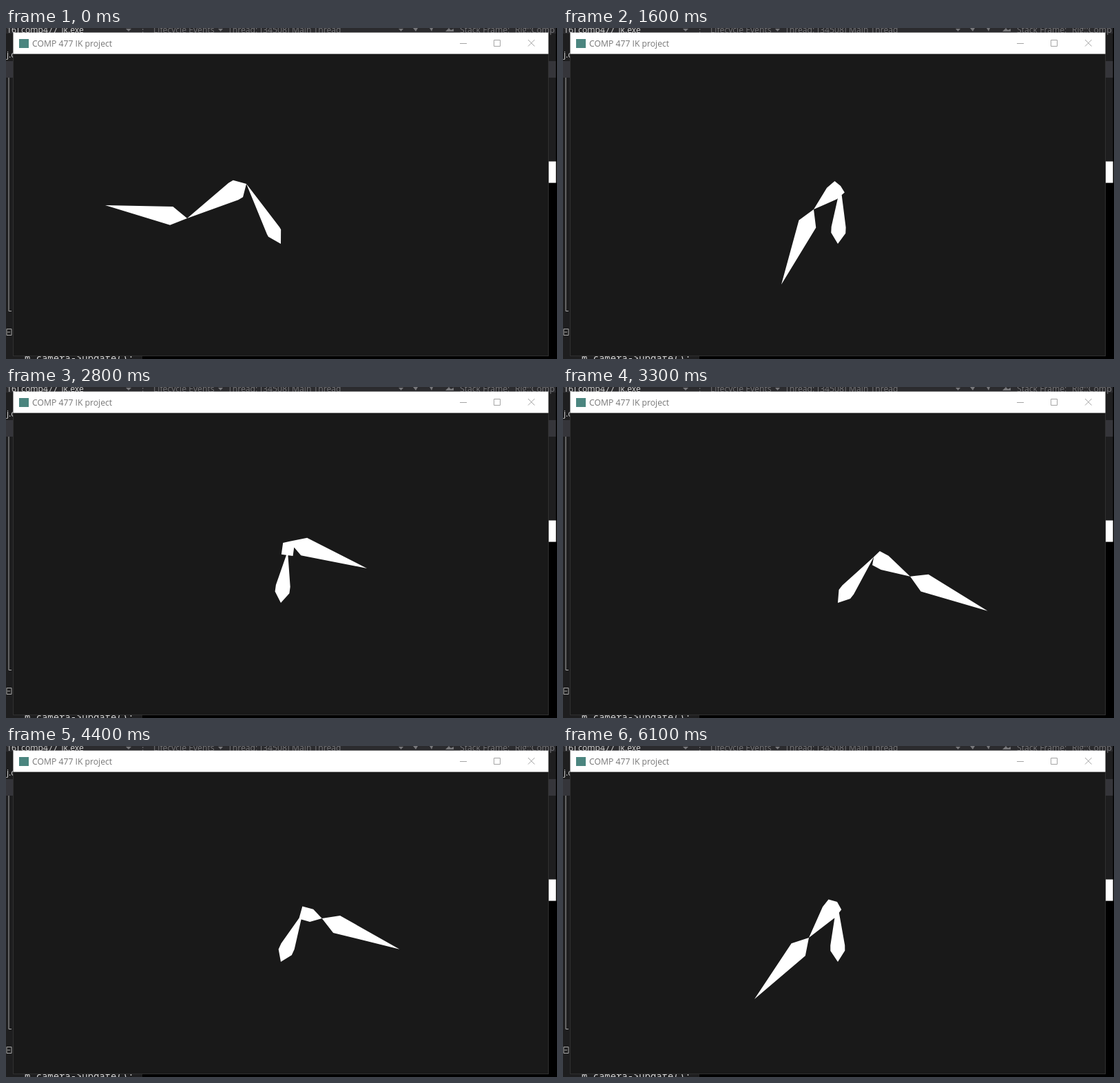
Animation, 800 px wide and 480 px high, one loop 6200 ms. Source, as an HTML page:

```html
<!DOCTYPE html>
<html lang="en">
<head>
<meta charset="utf-8">
<title>IK arm</title>
<style>
  html, body { margin: 0; width: 100%; height: 100%; overflow: hidden; background: #000; }
  svg { display: block; width: 800px; height: 480px; }
  text { font-family: "Open Sans", "Noto Sans", sans-serif; font-size: 12.2px; }
  .code { font-family: "Noto Sans Mono", "DejaVu Sans Mono", monospace; font-size: 13.9px; }
  .dim { fill: #77777a; }
  .lit { fill: #d4d4d4; }
  .line { fill: none; stroke: #a8a8a8; }
  .ctl { fill: none; stroke: #a4a4a4; }
</style>
</head>
<body>
<svg viewBox="0 0 800 480">
  <!-- editor behind the window -->
  <rect width="800" height="480" fill="#1e1e1f"/>
  <rect width="800" height="8" fill="#2b2b2e"/>
  <rect y="48" width="800" height="24" fill="#35353a"/>
  <rect x="787" y="225" width="13" height="255" fill="#000"/>
  <rect x="198" y="475" width="602" height="5" fill="#000"/>
  <rect x="798.5" width="1.5" height="480" fill="#000"/>
  <rect x="787" y="193.500" width="11.500" height="31" fill="#fff"/>
  <text class="lit" x="1" y="7">16] comp477_ik.exe</text>
  <g class="dim">
    <text x="197" y="7">⁝</text>
    <text x="214" y="7">Lifecycle Events</text>
    <text x="322" y="7">Thread:</text>
    <text x="369" y="7">[34508] Main Thread</text>
    <text x="659" y="7">Stack Frame:</text>
    <text x="739" y="7">Rig::Comp</text>
    <path d="M174 1h8l-4 4zM308 1h7l-3.500 4zM570 1h7l-3.500 4zM591 0h7l-3 5zM615 0h5l-2 5zM638 5l5-5 3 3 4-2v4z"/>
  </g>
  <text class="lit" x="1" y="43">j.c</text>
  <path class="line" d="M4 72V410.500H8M1 436.500H8V445.500H1zM2 441H6"/>
  <text class="lit code" x="27" y="484">m_camera-&gt;update();</text>

  <!-- application window -->
  <rect x="10" y="7" width="778" height="469" fill="#303030"/>
  <rect x="11" y="37" width="776" height="438" fill="#191919"/>
  <rect x="10.500" y="6.600" width="777" height="31" fill="#fff"/>
  <rect x="19" y="16" width="14" height="13" fill="#4b857f"/>
  <text x="38" y="27" fill="#777">COMP 477 IK project</text>
  <path class="ctl" d="M659 22.500h10M708.500 17.500h9v9h-9zM758 17l9.500 9.500M767.500 17l-9.500 9.500"/>

  <path id="arm" fill="#fff"/>
</svg>
<script>
const LOOP = 6200, STEP = 100, ROOT = [399, 313];

// one sweep from left to right: elbow, wrist and tip
const SWEEP = [
  [[349, 226], [263, 276], [144, 257]],
  [[375, 221], [314, 284], [194, 294]],
  [[398, 226], [357, 278], [278, 367]],
  [[403, 229], [364, 263], [317, 372]],
  [[406, 236], [358, 212], [385, 311]],
  [[408, 238], [368, 201], [460, 261]],
  [[409, 238], [411, 224], [524, 263]],
  [[485, 253], [578, 315], [690, 374]]
];

// time and place on the sweep
const RIDE = [
  [0, 0], [700, 0.33], [900, 1], [1400, 2], [1600, 3], [2100, 4], [2800, 6],
  [3500, 6.78], [3800, 7], [4200, 6.6], [4900, 5.5], [5100, 5], [6100, 2]
];

// shoulder distance and half width for a bone seen at a given length;
// depth is how far the shoulder opens when the bone points at the viewer
const BONES = [
  { full: 105, depth: 7, along: () => 20, across: () => 10.5 },
  { full: 112, depth: 8.5, along: len => 0.18 * len, across: len => 7.5 + 0.067 * len },
  { full: 130, depth: 0, along: () => 23, across: () => 13.5 }
];

const mix = (a, b, k) => a + (b - a) * k;

function placeAt(time) {
  const i = Math.max(1, RIDE.findIndex(([t]) => t >= time));
  const [t0, p0] = RIDE[i - 1], [t1, p1] = RIDE[i];
  return mix(p0, p1, (time - t0) / (t1 - t0));
}

function jointsAt(place) {
  const i = Math.min(Math.floor(place), SWEEP.length - 2);
  return SWEEP[i].map((p, j) => p.map((v, c) => mix(v, SWEEP[i + 1][j][c], place - i)));
}

function hull(points) {
  const half = list => {
    const out = [];
    for (const p of list) {
      while (out.length > 1) {
        const [a, b] = out.slice(-2);
        if ((b[0] - a[0]) * (p[1] - a[1]) - (b[1] - a[1]) * (p[0] - a[0]) > 0) break;
        out.pop();
      }
      out.push(p);
    }
    return out.slice(0, -1);
  };
  const sorted = [...points].sort((a, b) => a[0] - b[0] || a[1] - b[1]);
  return [...half(sorted), ...half(sorted.reverse())];
}

function bonePath({ full, depth, along, across }, base, tip) {
  const dx = tip[0] - base[0], dy = tip[1] - base[1];
  const len = Math.hypot(dx, dy), ux = dx / len, uy = dy / len;
  const open = depth * Math.sqrt(Math.max(0, 1 - (len / full) ** 2));
  const points = [base, tip];
  for (const side of [-1, 1])
    for (const end of [-1, 1]) {
      const a = along(len) + end * open, w = side * across(len);
      points.push([base[0] + ux * a + uy * w, base[1] + uy * a - ux * w]);
    }
  return "M" + hull(points).map(p => p.map(v => v.toFixed(2)).join(" ")).join("L") + "Z";
}

function armAt(time) {
  const chain = [ROOT, ...jointsAt(placeAt(time))];
  return BONES.map((bone, i) => bonePath(bone, chain[i], chain[i + 1])).join("");
}

const arm = document.getElementById("arm");
const start = performance.now();

function draw(now) {
  const time = Math.max(0, now - start) % LOOP;
  arm.setAttribute("d", armAt(Math.floor(time / STEP) * STEP));
  requestAnimationFrame(draw);
}
draw(start);
</script>
</body>
</html>
```
